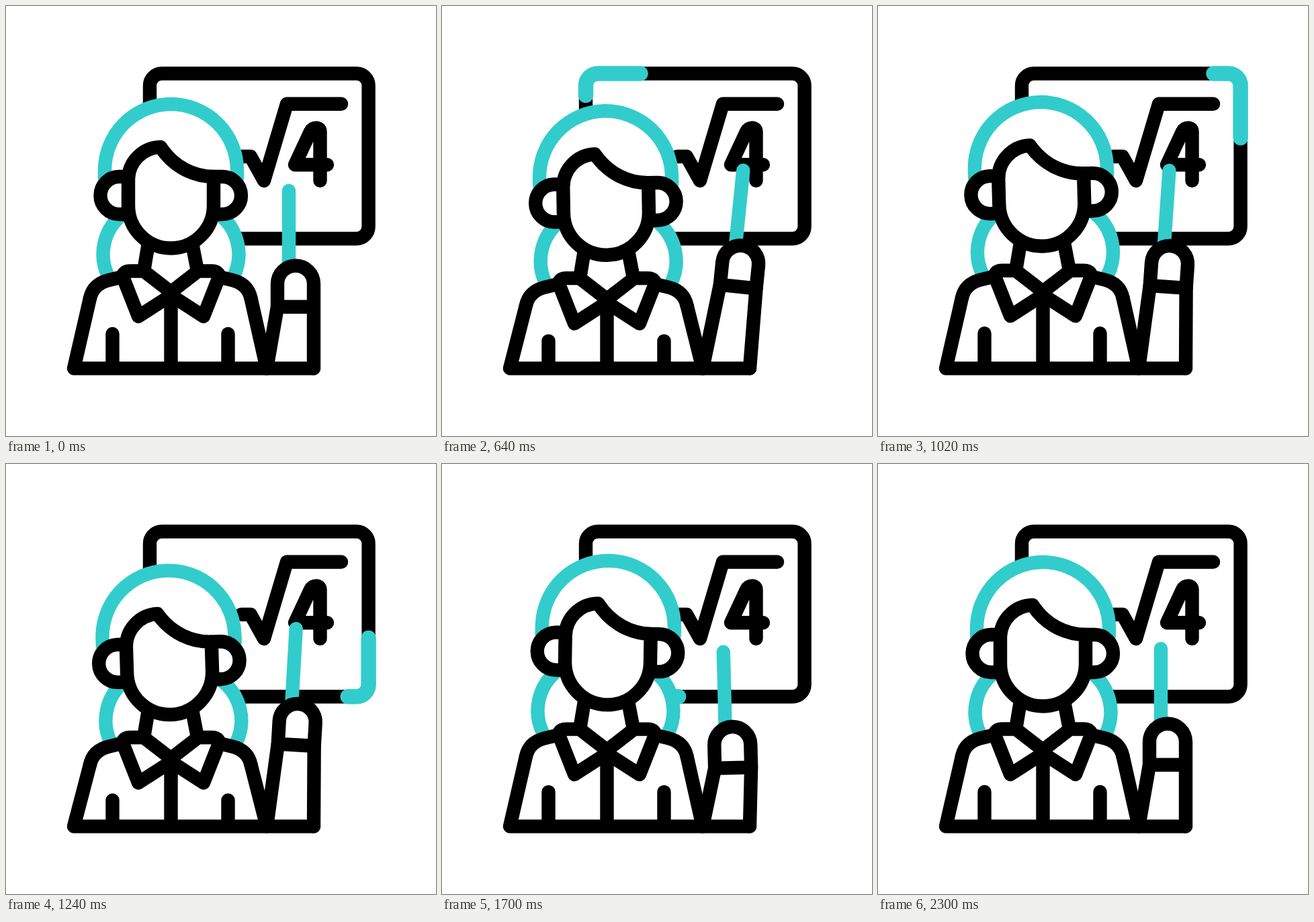
An HTML page for the animation above (2.48 s loop, 640 by 640 pixels).

```html
<!DOCTYPE html>
<html lang="en">
<head>
<meta charset="utf-8">
<title>Maths teacher</title>
<style>
  html, body { margin: 0; width: 100%; height: 100%; overflow: hidden; background: #fff; }
  svg {
    display: block; width: 100%; height: 100%;
    fill: none; stroke: #000; stroke-width: 20.4; stroke-linecap: round; stroke-linejoin: round;
  }
  .teal { stroke: #33cccc; }
  #dash { stroke-width: 22.5; }
  .blank { fill: #fff; stroke: none; }
</style>
</head>
<body>
<svg viewBox="0 0 640 640">
  <path id="board" d="M214,216V118.5A18,18 0 0 1 232,100.5H521.6A18,18 0 0 1 539.6,118.5V328.2A18,18 0 0 1 521.6,346.2H349"/>
  <use id="dash" class="teal" href="#board"/>
  <path d="M350,224H364L384,260L418,145.7H499"/>
  <path d="M478,236.3H430L453,187C456.5,179.5 467.5,179.5 467.5,187V260"/>

  <path id="curls" class="teal" d="M174.5,309.5A75,75 0 0 0 152,402M316.5,309.5A75,75 0 0 1 339,402"/>

  <g id="torso">
    <path d="M212,353L205.5,392M277,353L284.5,392"/>
    <path d="M249,428.5L205,394.5H184C176,394.5 172,400 175,406L197,462Z"/>
    <path d="M242,428.5L286,394.5H307C315,394.5 319,400 316,406L294,462Z"/>
    <path d="M174,403L153,408C137,412 128,421 125,435M316,403L337,408C353,412 361.5,421 364.5,435"/>
  </g>
  <path id="sides"/>

  <g id="head">
    <path class="blank" d="M147,250V245A98.5,98.5 0 0 1 344,245V250Z"/>
    <path class="teal" d="M147,256V244.5A98.5,98.5 0 0 1 344,244.5V256"/>
    <path d="M182,259A49,49 0 0 1 230,210C250,240 280,254 309,254V297A63.5,63.5 0 0 1 182,297Z"/>
    <path d="M182,254H168.5A28,28 0 0 0 168.5,310H182M309,254H322A28,28 0 0 1 322,310H309"/>
  </g>

  <g id="hand">
    <path class="teal" d="M421,275V384"/>
    <path d="M404,447.7V413.5A27,27 0 0 1 458,413.5V447.7Z"/>
  </g>
  <path id="forearm"/>
</svg>
<script>
const LOOP = 2480, BEGIN = 285, END = 2300;
const BOB = 670;                          // one dip of the body
const TRAVEL = 870, RUN = 1415, LAG = 145; // dash around the board
const PALM = [431, 413.5];

const $ = id => document.getElementById(id);
const move = (id, value) => $(id).setAttribute('transform', value);

const smooth = (from, to, t) => {
  const u = Math.min(1, Math.max(0, (t - from) / (to - from)));
  return u * u * (3 - 2 * u);
};

// Starts at 0 and eases to each [time, value] in turn.
const path = (...keys) => t => {
  let value = 0, from = BEGIN, last = 0;
  for (const [to, next] of keys) {
    value += (next - last) * smooth(from, to, t);
    from = to;
    last = next;
  }
  return value;
};

const tilt = path([500, -0.9], [1240, -1.75], [1640, 1.1], [2020, -1.3], [END, 0]);
const handX = path([530, 15], [980, 3], [END, 0]);
const handY = path([530, -30], [1240, -29.5], [1560, 5], [END, 0]);
const handTurn = path([530, 6], [1240, 3.3], [1560, -1.6], [END, 0]);

function along(t) {
  const u = Math.min(1, Math.max(0, (t - BEGIN) / RUN));
  return TRAVEL * smooth(0, 1, u ** 0.87);
}

function drawDash(t) {
  const tail = along(t - LAG);
  $('dash').style.strokeDasharray = `${along(t) - tail} 3000`;
  $('dash').style.strokeDashoffset = -tail;
}

function drawBody(t) {
  const fade = smooth(BEGIN, 440, t) * (1 - smooth(1850, END, t));
  const wave = Math.cos(2 * Math.PI * (t - 1240) / BOB);
  const dy = fade * (3.5 + 9 * wave);
  const headY = dy - fade * 1.6 * (1 - wave);
  const lean = tilt(t);

  move('torso', `translate(0 ${dy})`);
  move('head', `translate(0 ${headY}) rotate(${lean} 245.5 360)`);
  move('curls', `translate(${-2.2 * lean} ${headY})`);
  $('sides').setAttribute('d',
    `M125,${435 + dy}L101,539.4H458M364.5,${435 + dy}L388,539.4` +
    `M245.5,${427 + dy}V539M158.5,${488 + dy}V539M330.5,${488 + dy}V539`);
}

function drawArm(t) {
  const x = handX(t), y = handY(t), turn = handTurn(t);
  const c = Math.cos(turn * Math.PI / 180), s = Math.sin(turn * Math.PI / 180);
  const wrist = (dx, down = 34.2) =>
    `${PALM[0] + x + dx * c - down * s},${PALM[1] + y + dx * s + down * c}`;
  move('hand', `translate(${x} ${y}) rotate(${turn} ${PALM})`);
  $('forearm').setAttribute('d', `M${wrist(-27)}L388,539.4M${wrist(27)}L458,539.4`);
}

const start = performance.now();
function tick() {
  const t = (performance.now() - start) % LOOP;
  drawDash(t);
  drawBody(t);
  drawArm(t);
  requestAnimationFrame(tick);
}
tick();
</script>
</body>
</html>
```
